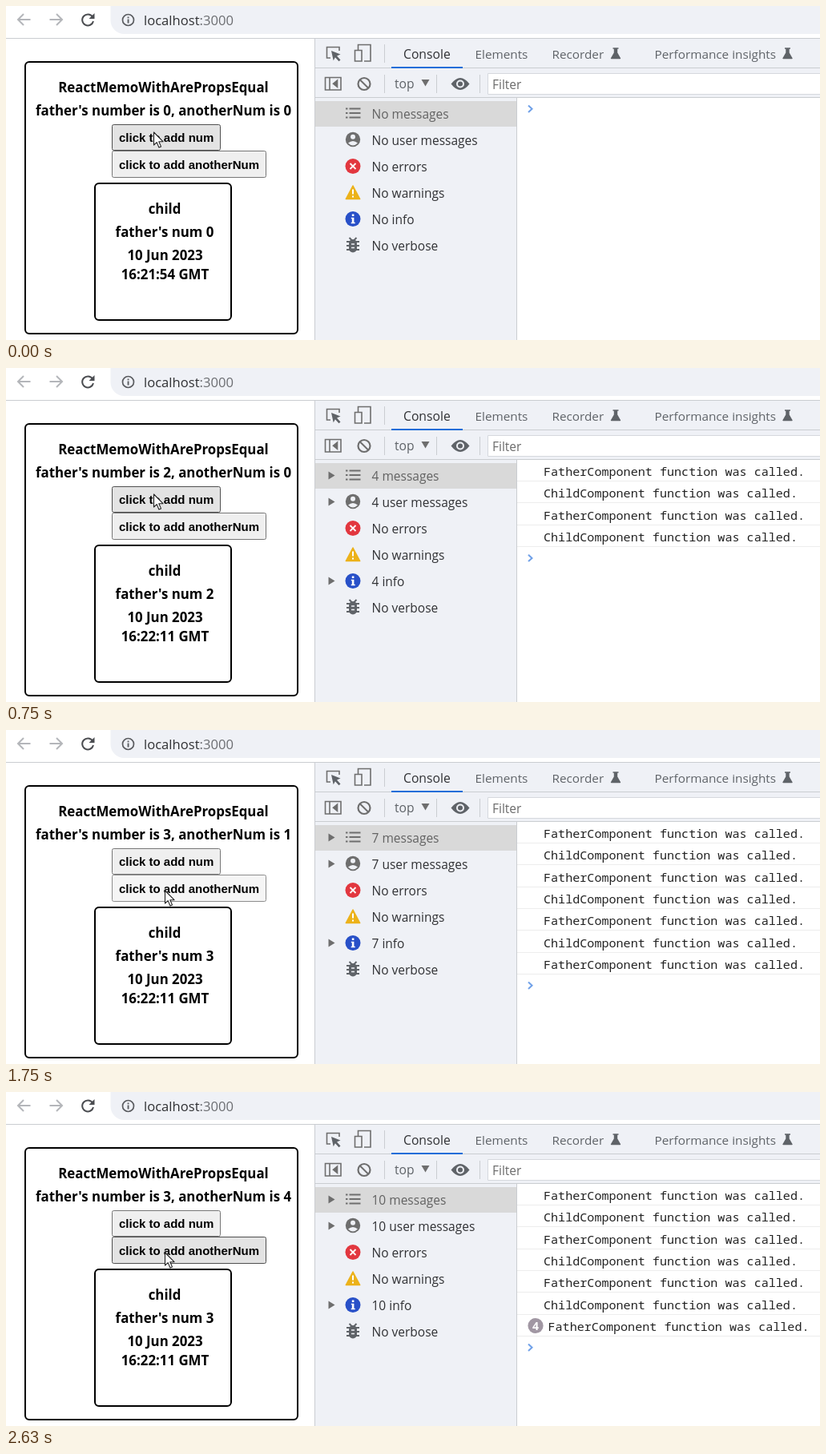
Recreate the animation shown at these times as an HTML page. Size 1016 px wide and 418 px high, loop 2760 ms.

```html
<!DOCTYPE html>
<html lang="en">
<head>
<meta charset="utf-8">
<title>React memo demo</title>
<style>
html, body { margin: 0; width: 100%; height: 100%; overflow: hidden; background: #fff; }
svg { display: block; }
text { font: 15.5px "Open Sans", "Noto Sans", sans-serif; fill: #303134; white-space: pre; }
.page text { font-weight: 700; font-size: 16.85px; fill: #000; text-anchor: middle; }
.page .label { font: 700 15px "Liberation Sans", Arial, sans-serif; text-anchor: start; }
.tabs text { font-size: 15.3px; fill: #5f6368; }
.log text { font: 15.1px "Noto Sans Mono", "DejaVu Sans Mono", monospace; fill: #222; }
.log .count { font: 700 14px "Open Sans", sans-serif; fill: #fff; text-anchor: middle; }
.box { fill: #fff; stroke: #000; stroke-width: 2; }
.line { fill: none; stroke-width: 2; }
.rule { stroke: #cacdd1; }
</style>
</head>
<body>
<svg width="1016" height="418" viewBox="0 0 1016 418">
  <defs>
    <g id="flask"><path d="M-3.5-6.5h7M-1.5-6v5L-5.5 6h11L1.5-1v-5z" fill="#5f6368" stroke="#5f6368" stroke-width="1.4" stroke-linejoin="round"/></g>
    <path id="fold" d="M-3.5-5L4.5 0L-3.5 5z" fill="#6e6e6e"/>
    <path id="prompt" d="M652 124.5l4.5 4.2l-4.5 4.2" fill="none" stroke="#6fa0e8" stroke-width="2"/>
  </defs>

  <!-- address bar -->
  <path d="M1016 0H130.500V18a17 17 0 0 0 17 17H1016z" fill="#eff1f6"/>
  <g class="line" stroke="#b4b6ba" stroke-width="2">
    <path d="M30.500 17H15M22 10l-7 7l7 7"/>
    <path d="M54.500 17H70M63 10l7 7l-7 7"/>
  </g>
  <path class="line" stroke="#4b4d51" d="M108 13.500A7 7 0 1 0 109 19"/>
  <path d="M110.500 9v7h-7z" fill="#4b4d51"/>
  <circle class="line" cx="152.500" cy="17.500" r="7" stroke="#5a5c60" style="stroke-width:1.7"/>
  <path d="M151.600 13.400h1.900v1.900h-1.900zM151.600 16.600h1.900v5h-1.900z" fill="#5a5c60"/>
  <text x="172" y="23.500" style="font-size:16.6px">localhost<tspan fill="#6b6d71">:3000</tspan></text>
  <path class="rule" d="M0 40.500H1016" stroke="#dadce0"/>

  <!-- page -->
  <g class="page">
    <rect class="box" x="24" y="70" width="340" height="340" rx="5"/>
    <text x="196.500" y="108">ReactMemoWithArePropsEqual</text>
    <text id="father" x="196.500" y="137"></text>
    <rect id="btn0" x="132.500" y="148.500" width="135" height="32" rx="2"/>
    <text class="label" x="141" y="170">click to add num</text>
    <rect id="btn1" x="132.500" y="181.500" width="192" height="33" rx="2"/>
    <text class="label" x="141" y="204">click to add anotherNum</text>
    <rect class="box" x="111" y="222" width="170" height="171" rx="5"/>
    <text x="198" y="260">child</text>
    <text id="child" x="198" y="289"></text>
    <text x="198.500" y="318">10 Jun 2023</text>
    <text id="clock" x="198.500" y="342"></text>
  </g>

  <!-- developer tools -->
  <path d="M386 41H1016V115H638V418H386z" fill="#eff1f6"/>
  <path class="rule" d="M385.500 41V418M386 77.500H1016M386 114.500H1016M637.500 115V418M472.500 48V71M472.500 86V109M537.500 86V109M591.500 86V109"/>
  <path d="M481 76h89v2h-89z" fill="#1a6dd8"/>
  <g class="line" stroke="#6e6e6e" style="stroke-width:1.600">
    <path d="M405 65h-4.500V51.500H416V56"/>
    <path d="M439.500 55v-6.500h15.500V69h-8M435.500 55.500h8.500V69h-8.500z"/>
    <path d="M398.500 89.500h19.500v15.500h-19.500zM404 89.500v15.500M413.500 93l-5 4.200l5 4.200z"/>
    <path d="M441.500 92l11 11" stroke-width="2"/>
    <circle cx="447" cy="97.500" r="7.500" style="stroke-width:2.200"/>
  </g>
  <path d="M406 56l11.500 4.500l-4.500 2l4.500 5l-2 1.800l-4.600-5l-2.200 4z" fill="#5f6368"/>
  <path d="M408.500 97.200l5-4.200v8.400z" fill="#6e6e6e"/>
  <g class="tabs">
    <text x="496" y="65.500" style="font-size:15.700px;fill:#303134">Console</text>
    <text x="585.500" y="65.500">Elements</text>
    <text x="681.500" y="65.500">Recorder</text>
    <text x="809.500" y="65.500">Performance insights</text>
    <use href="#flask" x="761" y="59.500"/>
    <use href="#flask" x="975.500" y="59.500"/>
    <text x="485" y="102.500" style="font-size:15.700px">top</text>
  </g>
  <path d="M518.500 92h10l-5 8.500z" fill="#6e6e6e"/>
  <path d="M555.500 97.500q11.500-15 23 0q-11.500 15-23 0z" fill="#5f6368"/>
  <circle cx="567" cy="97.500" r="4" fill="#5f6368" stroke="#eff1f6" stroke-width="2"/>
  <path d="M1016 84.500H601.500v26H1016" fill="#fff" stroke="#d5d8dd"/>
  <text x="607" y="103.500" style="fill:#6b6b6b">Filter</text>

  <!-- sidebar -->
  <path d="M386 119h251v32h-251z" fill="#d9d9d9"/>
  <path d="M424 128.500h2.500M424 134h2.500M424 139.500h2.500M428.500 128.500H442.500M428.500 134H442.500M428.500 139.500H442.500" stroke="#6e6e6e" stroke-width="2"/>
  <circle cx="433" cy="167" r="9.200" fill="#6e6e6e"/>
  <circle cx="433" cy="163.800" r="3" fill="#eff1f6"/>
  <path d="M427 171.500q6-5 12 0q-6 6-12 0z" fill="#eff1f6"/>
  <circle cx="433" cy="200.500" r="9.500" fill="#e2373f"/>
  <path d="M429.500 197l7 7M436.500 197l-7 7" stroke="#fff" stroke-width="1.800"/>
  <path d="M433 225l8.700 16.500h-17.400z" fill="#ecb21a" stroke="#ecb21a" stroke-width="1.500" stroke-linejoin="round"/>
  <path d="M432 229.500h2v6h-2zM432 237.500h2v2h-2z" fill="#fff"/>
  <circle cx="433" cy="266.500" r="9.500" fill="#2850c8"/>
  <path d="M431.800 260.500h2.600v2.500h-2.600zM430.800 264.800h3.600v6h1.300v1.500h-5v-1.500h1.100v-4.500h-1z" fill="#fff"/>
  <path d="M425 295h16M425 300h16M425 305h16M428.500 290l3 3M437.500 290l-3 3" stroke="#5f6368" stroke-width="2"/>
  <rect x="428" y="292" width="10" height="16.500" rx="5" fill="#5f6368"/>
  <path d="M431 298h4M431 302.500h4" stroke="#eff1f6" stroke-width="1.600"/>
  <g id="side"></g>

  <!-- console -->
  <g class="log" id="log"></g>
  <g class="log" id="badge">
    <circle cx="661" cy="292.500" r="9.600" fill="#a197a3"/>
    <text class="count" id="count" x="661" y="297.500"></text>
  </g>
  <use id="caret" href="#prompt"/>

  <path id="cursor" d="M0 0V16L3.700 12.600L6.400 19L9 17.900L6.300 11.700H11.500z" fill="#fff" stroke="#222" stroke-width="1.100" stroke-linejoin="round"/>
</svg>
<script>
const $ = id => document.getElementById(id);
const LOOP = 2760, PITCH = 27.3;
const kinds = ["messages", "user messages", "errors", "warnings", "info", "verbose"];
const counted = [0, 1, 4];

$("side").innerHTML = kinds.map((k, i) => {
  const fold = counted.includes(i) ? `<use href="#fold" x="406" y="${134.5 + 33 * i}"/>` : "";
  return `<text x="456.500" y="${140.5 + 33 * i}"${i ? "" : ' style="fill:#626262"'}></text>${fold}`;
}).join("");
const sideText = [...$("side").querySelectorAll("text")];
const folds = [...$("side").querySelectorAll("use")];

$("log").innerHTML = Array.from({ length: 7 }, (_, i) => {
  const y = i * PITCH, name = i % 2 ? "Child" : "Father";
  return `<g><text x="671" y="${135 + y}">${name}Component function was called.</text>
    <path d="M638 ${Math.round(141 + y) + .5}H1016" stroke="#ededed"/></g>`;
}).join("");
const rows = [...$("log").children];

// tick, num, anotherNum, console rows, messages, seconds
const steps = [
  [0, 0, 0, 0, 0, "21:54"],
  [4, 1, 0, 1, 2, "22:10"],
  [5, 1, 0, 2, 2, "22:10"],
  [6, 2, 0, 4, 4, "22:11"],
  [8, 3, 0, 6, 6, "22:11"],
  [13, 3, 1, 7, 7, "22:11"],
  [15, 3, 2, 7, 8, "22:11"],
  [17, 3, 3, 7, 9, "22:11"],
  [20, 3, 4, 7, 10, "22:11"]
];
const presses = [3, 5, 7, 12, 14, 16, 19];
const path = [[0, 184.5, 158], [9, 184.5, 158], [11, 201.5, 196.5], [12, 198.5, 201], [22, 198.5, 201]];

function pointer(tick) {
  const i = path.findIndex(p => p[0] > tick);
  const [a, b] = [path[i - 1], path[i]], k = (tick - a[0]) / (b[0] - a[0]);
  return [a[1] + (b[1] - a[1]) * k, a[2] + (b[2] - a[2]) * k];
}

function show(el, on) { el.style.display = on ? "" : "none"; }

function paintButton(el, over, down) {
  el.setAttribute("fill", !over ? "#efefef" : down ? "#f5f5f5" : "#e3e3e3");
  el.setAttribute("stroke", !over ? "#767676" : down ? "#8d8d8d" : "#4f4f4f");
}

function draw(tick) {
  const [, num, other, lines, total, time] = steps.findLast(s => s[0] <= tick);
  $("father").textContent = `father's number is ${num}, anotherNum is ${other}`;
  $("child").textContent = `father's num ${num}`;
  $("clock").textContent = `16:${time} GMT`;

  sideText.forEach((el, i) => {
    el.textContent = `${counted.includes(i) && total || "No"} ${kinds[i]}`;
  });
  folds.forEach(el => show(el, total));

  rows.forEach((el, i) => show(el, i < lines));
  rows[6].firstChild.setAttribute("x", other > 1 ? 676.5 : 671);
  show($("badge"), other > 1);
  $("count").textContent = other;
  $("caret").setAttribute("y", lines * PITCH);

  const [x, y] = pointer(tick), down = presses.includes(tick);
  $("cursor").setAttribute("transform", `translate(${x} ${y})`);
  paintButton($("btn0"), y < 181, down);
  paintButton($("btn1"), y >= 181, down);
}

function frame() {
  const t = performance.now() % LOOP;
  draw(Math.min(21, Math.floor(Math.floor(t / 10) / 12.5)));
  requestAnimationFrame(frame);
}
frame();
</script>
</body>
</html>
```
